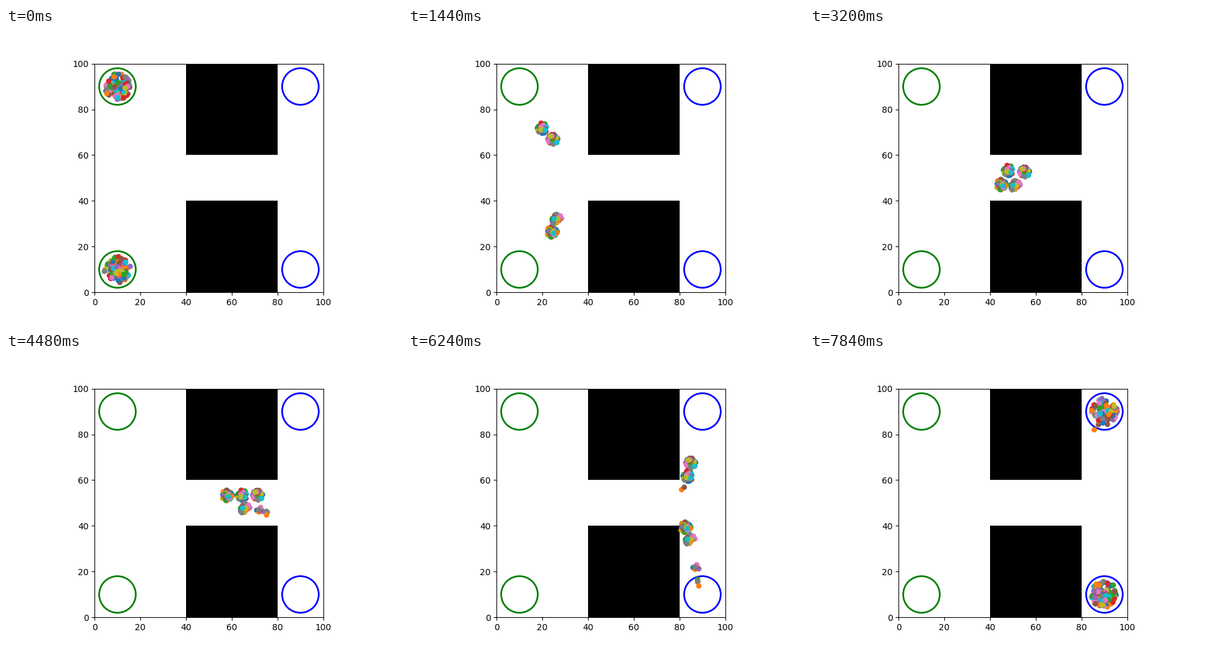
A matplotlib script for the animation above (8 s loop, 640 by 480 pixels).

```python
import numpy as np
import matplotlib.pyplot as plt
from matplotlib.animation import FuncAnimation
from matplotlib.patches import Circle, Rectangle

FRAMES, INTERVAL = 50, 160
TEAM = 100

rng = np.random.default_rng(12)


class Route:
    """Start circle, gather, gap mouth, gap lane, gap exit, goal circle."""

    def __init__(self, y, gather, mouth, lane, leave, arrive):
        exit_y = 50 + np.sign(y - 50) * 6
        self.points = np.array([(10, y), gather, mouth, lane, (80, exit_y), (90, y)])
        self.times = np.array([0, 9, 20, 28, leave, arrive])
        d = np.diff(self.points, axis=0) / np.diff(self.times)[:, None]
        a, b = d[:-1], d[1:]
        same = a * b > 0
        # Harmonic mean slopes keep the curve from overshooting.
        mid = np.where(same, 2 * a * b / np.where(same, a + b, 1), 0)
        self.slopes = np.vstack([d[:1], mid, d[-1:]])

    def at(self, t):
        t = np.clip(t, 0, self.times[-1])
        k = np.clip(np.searchsorted(self.times, t, side="right") - 1, 0,
                    len(self.times) - 2)
        h = (self.times[k + 1] - self.times[k])[:, None]
        u = (t - self.times[k])[:, None] / h
        s = smooth(u)
        bend = (1 - u) * self.slopes[k] - u * self.slopes[k + 1]
        return (self.points[k] * (1 - s) + self.points[k + 1] * s
                + h * u * (1 - u) * bend)


def smooth(t):
    t = np.clip(t, 0, 1)
    return t * t * (3 - 2 * t)


def disc(n, radius):
    r = radius * rng.random(n) ** 0.7
    a = 2 * np.pi * rng.random(n)
    return np.column_stack([r * np.cos(a), r * np.sin(a)])


ROUTES = [
    Route(90, (19.8, 71.8), (47.8, 53.3), (64.4, 53.4), 35.5, 48),
    Route(90, (24.6, 66.9), (55.1, 52.6), (71.3, 53.4), 32.5, 48),
    Route(10, (26.2, 32.0), (51.0, 46.7), (65.7, 47.6), 35.0, 45),
    Route(10, (24.2, 26.4), (44.9, 47.1), (57.9, 53.3), 37.3, 45),
]

n = 2 * TEAM
index = np.arange(n)
group = 2 * (index // TEAM) + index // 10 % 2

# A few agents drop behind or run ahead of their group inside the gap.
lag = np.zeros(n)
lag[[1, 5]] = 3.5, 2.5
lag[140:148] = -3
lag[[101, 102, 107, 121]] = -4.5

first, pack, final = disc(n, 5.8), disc(n, 2.3), disc(n, 5.8)
pack[lag != 0] *= 0.6


def positions(frame):
    t = frame - lag * smooth((frame - 20) / 8)
    xy = np.empty((n, 2))
    for g, route in enumerate(ROUTES):
        xy[group == g] = route.at(t[group == g])
    leave = smooth(t / 7)[:, None]
    arrive = smooth((t - 42) / 6)[:, None]
    return xy + first * (1 - leave) + pack * (leave - arrive) + final * arrive


fig, ax = plt.subplots(figsize=(6.4, 4.8), dpi=100)
ax.set_aspect("equal")
ax.set_xlim(0, 100)
ax.set_ylim(0, 100)

for y in (0, 60):
    ax.add_patch(Rectangle((40, y), 40, 40, facecolor="black"))
for x, color in ((10, "green"), (90, "blue")):
    for y in (10, 90):
        ax.add_patch(Circle((x, y), 8, fill=False, edgecolor=color, linewidth=2))

dots = ax.scatter(*positions(0).T, s=40, linewidths=0, zorder=2,
                  c=[f"C{i % 10}" for i in index])


def update(frame):
    dots.set_offsets(positions(frame))
    return (dots,)


anim = FuncAnimation(fig, update, frames=FRAMES, interval=INTERVAL,
                     repeat=True, repeat_delay=0)
plt.show()
```
